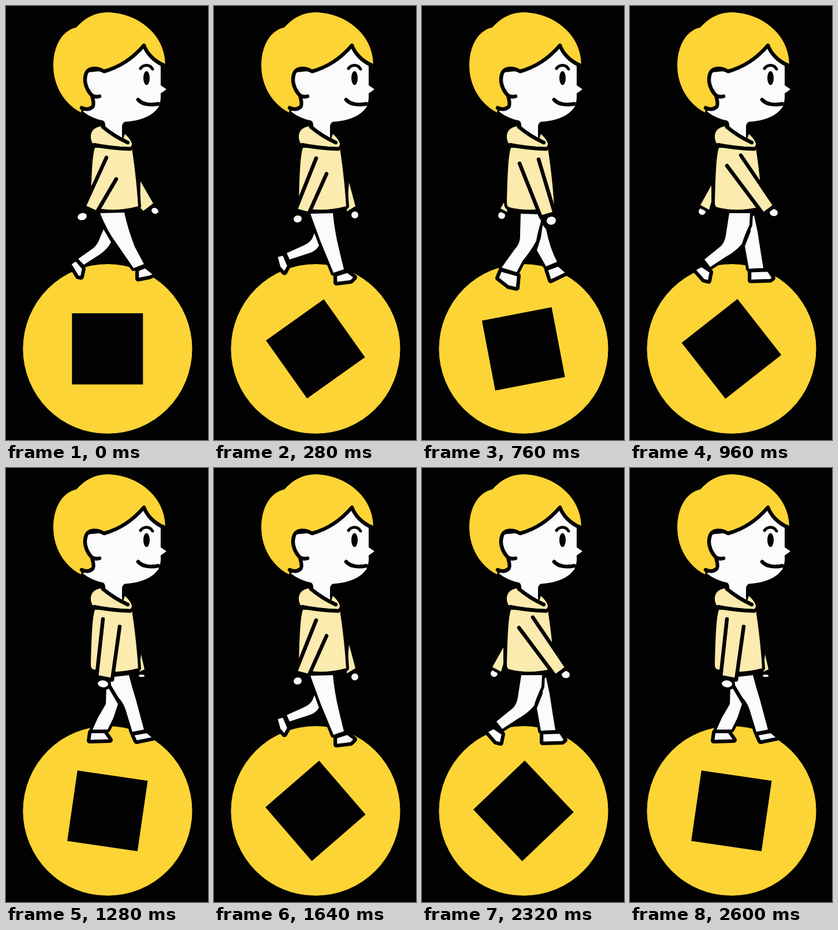
An HTML page with a canvas for the animation above (2640 ms loop, 350 px wide and 750 px high).

```html
<!DOCTYPE html>
<html lang="en">
<head>
<meta charset="utf-8">
<title>Walking on a wheel</title>
<style>
html, body { margin: 0; width: 100%; height: 100%; overflow: hidden; background: #020202; }
canvas { display: block; width: 350px; height: 750px; }
</style>
</head>
<body>
<canvas id="stage" width="350" height="750"></canvas>
<script>
const ctx = document.getElementById('stage').getContext('2d');
const YELLOW = '#fdd435', CREAM = '#fcebae', WHITE = '#fbfbfb', BLACK = '#020202';
const FRAME = 40, HALF_TURN = 33, POSE_FRAMES = 5.5;

// Arms: shoulder, wrist, wrist, armpit. Hands: x, y, rx, ry, tilt.
const stride = {
  farLeg: 'M169 386L182 408Q176 420 163 429L135 447L125 437L152 418Q160 410 163 400Z',
  farFoot: 'M112 446L121 440L133 454L130 468L125 467Z',
  nearLeg: 'M163 358L205 357Q211 385 223 416L239 446L221 453L190 408Q176 390 163 358Z',
  nearFoot: 'M229 457L241 452L256 464L249 467L229 471Z',
  farArm: 'M233 303L255 341L238 354L232 348Z', farHand: [258, 354, 6, 5, 0.4],
  nearArm: [174, 262, 135, 347, 157, 357, 191, 299], nearHand: [132, 364, 8, 6, -0.3]
};
const liftOff = {
  farLeg: 'M175 390L182 414Q176 424 165 427L131 438L126 427L155 414Q168 408 171 400Z',
  farFoot: 'M109 433L120 430L128 449L122 460L114 451Z',
  nearLeg: 'M167 359L206 358Q209 390 217 422L225 455L207 461L185 408Z',
  nearFoot: 'M212 466L231 460L243 469L237 475L212 478Z',
  farArm: 'M234 305L245 346L230 355Z', farHand: [244, 361, 6, 6, 0.4],
  nearArm: [177, 263, 141, 353, 164, 359, 195, 290], nearHand: [145, 368, 7, 6, -0.2]
};
const passing = {
  farLeg: 'M203 392L209 391Q205 425 206 457L188 459L199 425Z',
  farFoot: 'M188 463L205 463L213 477L190 479Z',
  nearLeg: 'M168 358L190 359L194 386L208 391Q200 407 198 424Q194 444 186 463L153 460L164 425Q170 408 168 385Z',
  nearFoot: 'M150 469L183 470L187 485Q165 488 145 481Z',
  nearArm: [173, 266, 183, 365, 213, 369, 206, 288], nearHand: [201, 379, 10, 9, 0]
};
const reach = {
  farLeg: 'M209 378L215 386Q222 420 234 442L215 450L199 422L206 400Z',
  farFoot: 'M217 456L236 449L250 461L223 474Z',
  nearLeg: 'M171 359L204 360L206 373Q200 392 198 406Q188 424 174 441L164 460L138 452L161 420Q171 410 170 394Z',
  nearFoot: 'M137 458L166 466L164 487L150 484L132 470Z',
  farArm: 'M144 336L136 350L148 356Z', farHand: [138, 362, 6, 6, -0.4],
  nearArm: [169, 272, 206, 365, 230, 358, 202, 265], nearHand: [224, 371, 8, 7, -0.2]
};
const push = {
  farLeg: 'M209 365L215 362L221 390Q226 423 231 453L206 454L199 415L209 390Z',
  farFoot: 'M209 459L239 458L247 470L243 473L209 474Z',
  nearLeg: 'M172 358L208 358L207 378Q198 397 194 411Q182 425 165 434L139 451L129 438L155 417Q165 410 167 390Z',
  nearFoot: 'M113 456L124 450L139 460L136 475L128 473Z',
  farArm: 'M141 310L122 344L137 352L141 338Z', farHand: [125, 355, 6, 6, 0.3],
  nearArm: [168, 276, 231, 360, 251, 345, 192, 258], nearHand: [249, 357, 7, 6, 0.2]
};
const returning = {
  farLeg: 'M174 374L194 408L186 432L176 452L150 452L159 432L173 408Z',
  farFoot: 'M147 457L171 457L180 470L145 471Z',
  nearLeg: 'M180 372L186 361L213 358Q218 378 225 400L239 452L219 456L207 417Q203 405 195 397Z',
  nearFoot: 'M221 461L244 457L255 466L226 472Z',
  farArm: 'M234 322L240 348L231 352Z', farHand: [235, 359, 5, 2, 0],
  nearArm: [168, 261, 157, 361, 184, 366, 197, 274], nearHand: [168, 373, 9, 6, 0.1]
};
const poses = [stride, liftOff, passing, reach, push, returning];

function line(path, width) {
  ctx.strokeStyle = BLACK;
  ctx.lineWidth = width;
  ctx.stroke(new Path2D(path));
}

function fill(path, color) {
  ctx.fillStyle = color;
  ctx.fill(path instanceof Path2D ? path : new Path2D(path));
}

// The outline lies outside the filled area.
function outlined(path, color, width = 10) {
  const shape = path instanceof Path2D ? path : new Path2D(path);
  ctx.strokeStyle = BLACK;
  ctx.lineWidth = width;
  ctx.stroke(shape);
  fill(shape, color);
}

function leg(legPath, footPath) {
  outlined(legPath, WHITE);
  outlined(footPath, WHITE);
  line(footPath, 2.5);
}

function hand([x, y, rx, ry, tilt]) {
  const shape = new Path2D();
  shape.ellipse(x, y, rx, ry, tilt, 0, 2 * Math.PI);
  outlined(shape, WHITE);
}

function wheel(angle) {
  const disc = new Path2D();
  disc.arc(176, 592.5, 146.6, 0, 2 * Math.PI);
  fill(disc, YELLOW);
  ctx.save();
  ctx.translate(175.8, 592.5);
  ctx.rotate(-angle * Math.PI / 180);
  ctx.fillStyle = BLACK;
  ctx.fillRect(-61.5, -61.5, 123, 123);
  ctx.restore();
}

function body(pose) {
  leg(pose.farLeg, pose.farFoot);
  leg(pose.nearLeg, pose.nearFoot);
  if (pose.farArm) {
    hand(pose.farHand);
    outlined(pose.farArm, CREAM);
  }
  outlined('M154 245C149 260 148 300 147 340Q147 347 152 348Q187 357 229 346C227 310 222 270 218 246Z', CREAM);
  hand(pose.nearHand);
  const [ax, ay, bx, by, cx, cy, dx, dy] = pose.nearArm;
  const sleeve = `M${ax} ${ay}L${bx} ${by}L${cx} ${cy}L${dx} ${dy}`;
  fill(sleeve, CREAM);
  line(sleeve, 6.5);
}

function head() {
  fill('M166 208C148 209 143 224 150 237Q157 241 215 244Q224 238 206 221L203 230Z', CREAM);
  line('M153 240Q182 246 215 247', 6.5);
  fill('M239 70Q249 91 268 99L268 137L278 144L268 151Q269 165 264 175C254 190 232 199 206 200Q202 202 201 207L201 229L172 211Q173 200 168 198Q148 194 133 182L152 174L150 156L140 140L138 115L170 112Q215 100 239 70Z', WHITE);
  line('M168 209Q187 225 211 236', 6.5);
  fill('M122 37C137 20 155 11 175 11C225 11 276 47 276 102Q250 92 239 68Q211 103 170 113C153 103 137 109 137 125Q137 142 149 153Q154 175 148 176Q140 180 131 176L130 184C101 169 82 138 82 103C82 68 98 42 122 37Z', YELLOW);
  line('M275 103C257 96 244 82 239 68C221 89 199 105 170 113C155 105 143 107 139 116C134 129 139 142 145 150C149 156 155 158 162 156M149 155Q154 172 149 175Q142 181 131 176', 6.5);
  line('M233 108C238 101 249 100 254 109', 5);
  const eye = new Path2D();
  eye.ellipse(243.5, 124.5, 5.5, 12, 0, 0, 2 * Math.PI);
  fill(eye, BLACK);
  line('M229 162C236 170 250 172 264 169', 6.5);
}

function draw(time) {
  const frame = Math.floor((time + 4) / FRAME) % (2 * HALF_TURN);
  const step = frame % HALF_TURN;
  const turned = frame < HALF_TURN ? 0 : 180;
  ctx.fillStyle = BLACK;
  ctx.fillRect(0, 0, 350, 750);
  wheel(turned + Math.max(0, step * 180 / HALF_TURN - 2.8));
  body(poses[Math.floor(step / POSE_FRAMES)]);
  head();
}

function tick(now) {
  draw(now);
  requestAnimationFrame(tick);
}

ctx.lineCap = ctx.lineJoin = 'round';
draw(0);
requestAnimationFrame(tick);
</script>
</body>
</html>
```
